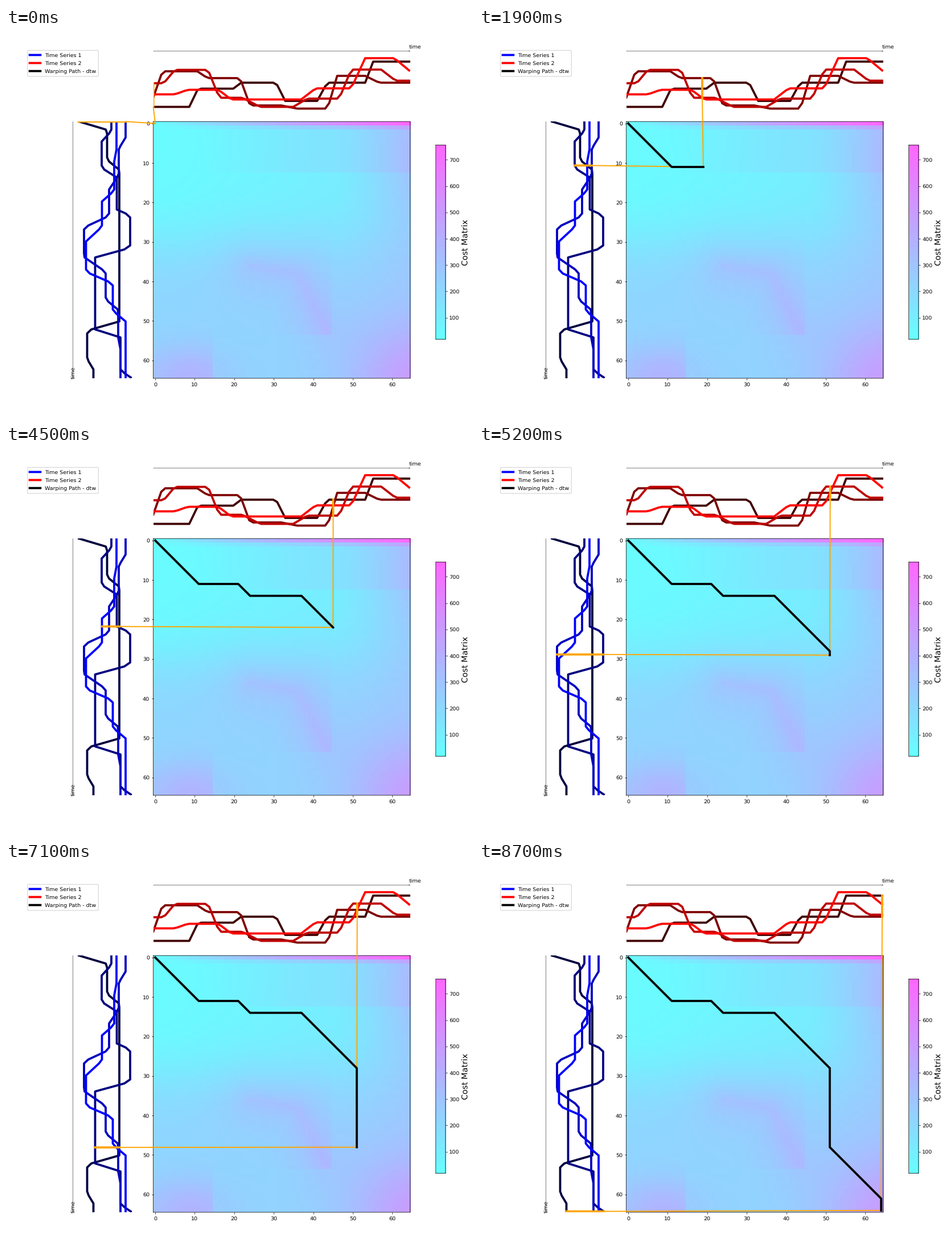
These frames come from a looping animation (820 px wide and 683 px high, 9800 ms). A matplotlib script:

```python
import numpy as np
import matplotlib.pyplot as plt
from matplotlib.animation import FuncAnimation
from matplotlib.patches import FancyBboxPatch, Polygon

W, H, DPI = 820, 683, 72
S = 820 / 864                      # pixels per point
L, T, R, B = 258.6, 164.2, 709.6, 615.0   # cost matrix box
N = 65
CELL = (R - L) / N
STEP = 7.02                        # pixels per sample beside the matrix
THICK, THIN = 4 * S, 2 * S

plt.rcParams.update({
    "font.family": "DejaVu Sans", "font.size": 10 * S, "text.hinting": "no_hinting",
    "path.snap": False, "axes.linewidth": 0.8 * S,
    "xtick.major.size": 3.5 * S, "ytick.major.size": 3.5 * S,
    "xtick.major.pad": 3.5 * S, "ytick.major.pad": 3.5 * S,
    "xtick.major.width": 0.8 * S, "ytick.major.width": 0.8 * S,
})

fig = plt.figure(figsize=(W / DPI, H / DPI), dpi=DPI, facecolor="white")


def box_axes(x0, y0, x1, y1, **kw):
    return fig.add_axes([x0 / W, 1 - y1 / H, (x1 - x0) / W, (y1 - y0) / H], **kw)


def pixel_axes(x0, y0, x1, y1, z):
    """Axes whose data coordinates are stage pixels, y down."""
    ax = box_axes(x0, y0, x1, y1, zorder=z)
    ax.set_xlim(x0, x1)
    ax.set_ylim(y1, y0)
    ax.axis("off")
    return ax


# --- cost matrix -----------------------------------------------------------
def hump(x, y, cx, cy, wx, wy):
    return np.exp(-((x - cx) / wx) ** 2 - ((y - cy) / wy) ** 2)


def cost_matrix():
    """Cost from 0 to 1 for each pair of samples."""
    n = np.arange(N)
    x, y = np.meshgrid(n, n)
    u = x / 64

    # rise towards the bottom and the right, with a raised band on top
    cost = 0.02 + 0.25 * (1 - 0.4 * u) / (1 + np.exp((30 - y) / 4.5))
    cost += 0.14 * u ** 1.3
    cost += 0.22 * np.clip((x - 45) / 19, 0, 1) ** 1.5 * np.exp(-((y - 8) / 25) ** 2)
    cost += 0.07 * np.clip((x - 10) / 25, 0, 1) * (y < 13)

    # the two lower corners
    cost += 0.33 * hump(x, y, 66, 66, 16, 16)
    cost += 0.22 * hump(x, y, 9, 64, 13, 8) * np.where(x > 14, 0.4, 1)

    # bent ridge, cut off at its right and lower sides
    s = np.linspace(0, 1, 60)
    px = np.interp(s, [0, 0.4, 1], [24, 36, 43])
    py = np.interp(s, [0, 0.4, 1], [36, 38, 52])
    dist = np.hypot(x[..., None] - px, y[..., None] - py).min(axis=2)
    cost += 0.17 * np.exp(-dist / 6) * np.where((x > 44) | (y > 53), 0.5, 1)

    cost[0] = (n / 64) ** 0.9
    cost[1] = 0.3 * cost[0] + 0.7 * cost[2]
    return cost


mat = box_axes(L, T, R, B, zorder=1)
mat.imshow(cost_matrix(), cmap="cool", alpha=0.6, vmin=0, vmax=1,
           aspect="auto", interpolation="nearest")
mat.set_xticks(range(0, N, 10))
mat.set_yticks(range(0, N, 10))

bar = box_axes(754.7, 205.4, 771.8, 546.6, zorder=1)
bar.imshow(np.linspace(0, 1, 256)[:, None], cmap="cool", alpha=0.6, vmin=0, vmax=1,
           aspect="auto", origin="lower", extent=[0, 1, 17.7, 756.3])
bar.set_xticks([])
bar.yaxis.tick_right()
bar.set_yticks(range(100, 701, 100))

# --- labels, legend, time axes ---------------------------------------------
stage = pixel_axes(0, 0, W, H, 5)


def label(x, y, s, **kw):
    stage.text(x, y, s, va="baseline", rotation_mode="anchor", **kw)


label(810.5, 376, "Cost Matrix", ha="center", rotation=90, fontsize=15 * S)
label(708, 36, "time")
label(120.3, 615.5, "time", rotation=90)

stage.add_patch(FancyBboxPatch((37.8, 39.3), 124.4, 45.7, fc="white", ec="0.8", lw=S,
                               boxstyle="round,pad=0,rounding_size=1.9"))
legend = [("blue", "Time Series 1"), ("red", "Time Series 2"),
          ("black", "Warping Path - dtw")]
for i, (color, name) in enumerate(legend):
    y = 47.4 + 14.1 * i
    stage.plot([41.6, 60.4], [y, y], color=color, lw=THICK)
    label(68, y + 3.6, name)

stage.plot([L, R - 1], [40.5, 40.5], color="gray", lw=1, solid_capstyle="butt")
stage.plot([117.5, 117.5], [T, B - 1], color="gray", lw=1, solid_capstyle="butt")
stage.add_patch(Polygon([(707.5, 39), (707.5, 42), (710, 40.5)], fc="0.3", lw=0))
stage.add_patch(Polygon([(116, 612.5), (119, 612.5), (117.5, 615)], fc="0.3", lw=0))


# --- the two series ---------------------------------------------------------
def ramps(level, *moves):
    """Plateaus joined by ramps (start, end, new level), sampled at whole steps."""
    t, v = [0], [level]
    for start, end, new in moves:
        t += [start, end]
        v += [v[-1], new]
    return np.interp(np.arange(N), t, v)


top_series = np.array([
    ramps(138.5, (9, 11.2, 106.5), (20, 22, 96), (30.7, 33, 128), (41, 43.5, 96),
          (53, 55, 59)),
    ramps(122, (0, 2.3, 76), (11, 13.6, 88), (21.7, 24.2, 136), (32, 36, 141.5),
          (43.6, 46, 84), (53, 56.5, 96)),
    ramps(97, (2.6, 5.4, 73.5), (13.7, 16.5, 122.5), (22.3, 26.7, 138.5),
          (35, 38.5, 124), (46.5, 49.5, 73), (57, 60.6, 92.5)),
    ramps(116.5, (5.4, 8.6, 108.5), (16.3, 19.5, 125.5), (37, 40.6, 106),
          (49.5, 53, 53), (60.3, 64, 74.5)),
])
left_series = np.array([
    ramps(128, (0, 2.1, 177.5), (9.6, 12.1, 199), (50, 52.3, 142.5),
          (59.4, 62, 153.5)),
    ramps(185, (2.4, 5, 168), (11.6, 14, 194.5), (22, 23.5, 218), (31.6, 34, 156.5),
          (52, 54, 201), (62.3, 64, 219)),
    ramps(210, (4, 6.8, 198), (13.4, 17, 181), (23.6, 26.5, 137), (33.9, 37.6, 175),
          (44.5, 47.1, 197), (54, 57, 201)),
    ramps(194, (7, 10, 190), (17.3, 20, 168.5), (26.3, 30, 140.5),
          (37.6, 40.5, 187.5), (47.3, 50, 210)),
])

top = pixel_axes(L, 40, R, T, 3)
left = pixel_axes(110, T, L, B, 3)
steps = STEP * np.arange(N)
for i in range(4):
    shade = (i + 1) / 4
    top.plot(L + steps, top_series[i], color=(shade, 0, 0), lw=THICK)
    left.plot(left_series[i], T + steps, color=(0, 0, shade), lw=THICK)
top_lo, top_hi = top_series.min(axis=0), top_series.max(axis=0)
left_lo, left_hi = left_series.min(axis=0), left_series.max(axis=0)

# --- warping path: one cell per step between its corners ---------------------
corners = [(0, 0), (11, 11), (21, 11), (24, 14), (37, 14), (51, 28), (51, 48),
           (64, 61), (64, 64)]
path = [corners[0]]
for corner in corners[1:]:
    while path[-1] != corner:
        c, r = path[-1]
        path.append((c + (c < corner[0]), r + (r < corner[1])))
path_x = [L + (c + 0.5) * CELL for c, r in path]
path_y = [T + (r + 0.5) * CELL for c, r in path]

top_link, = stage.plot([], [], color="orange", lw=THIN, zorder=2)
left_link, = stage.plot([], [], color="orange", lw=THIN, zorder=2)
warp, = stage.plot([], [], color="black", lw=THICK, zorder=3)
top_span, = top.plot([], [], color="orange", lw=THICK, zorder=4)
left_span, = left.plot([], [], color="orange", lw=THICK, zorder=4)


def draw(i):
    k = min(i, len(path) - 1)
    c, r = path[k]
    x, y = L + STEP * c, T + STEP * r
    top_span.set_data([x, x], [top_lo[c], top_hi[c]])
    left_span.set_data([left_lo[r], left_hi[r]], [y, y])
    top_link.set_data([x, path_x[k]], [top_hi[c], path_y[k]])
    left_link.set_data([left_hi[r], path_x[k]], [y, path_y[k]])
    n = k + 1 if k else 0
    warp.set_data(path_x[:n], path_y[:n])
    return top_span, left_span, top_link, left_link, warp


anim = FuncAnimation(fig, draw, frames=98, interval=100, repeat=True, repeat_delay=0)
plt.show()
```
